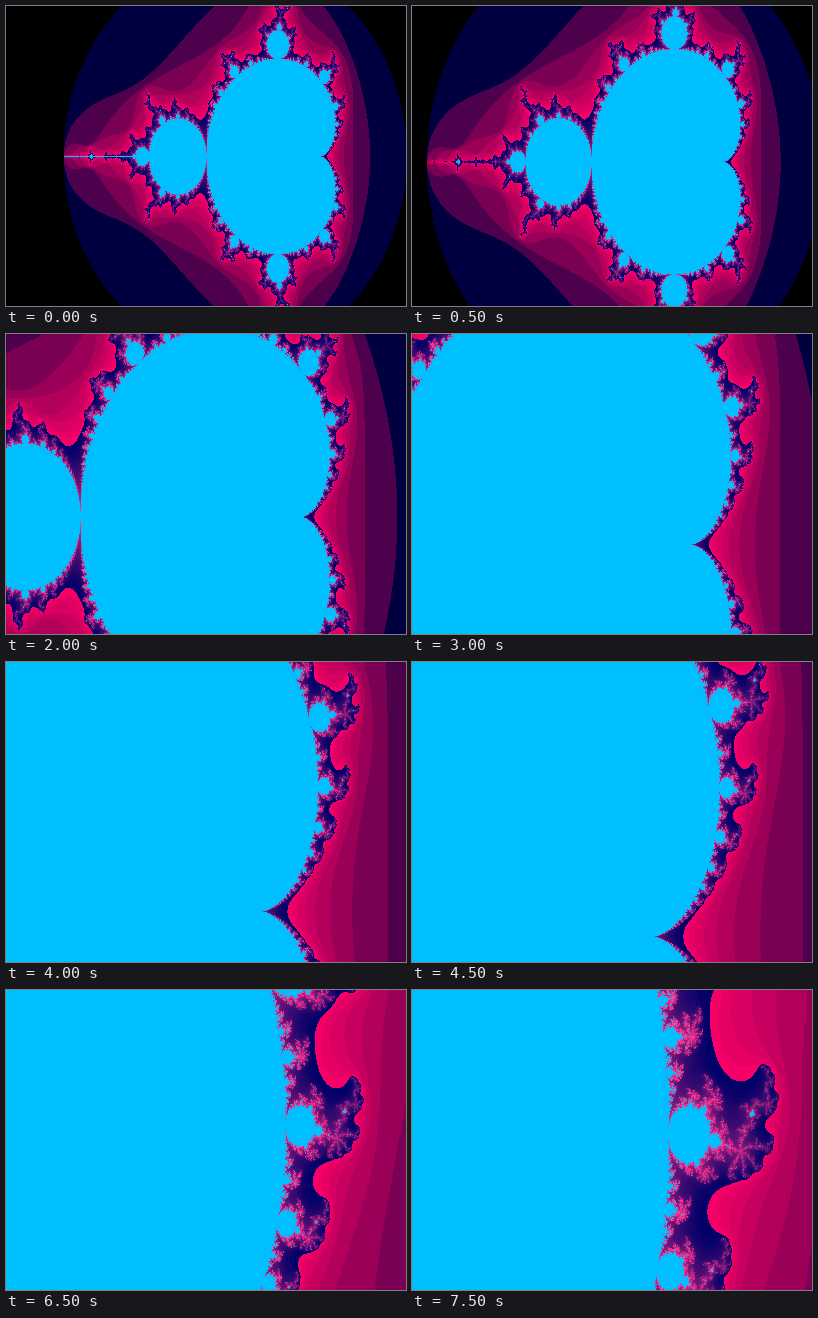
An HTML page with a canvas for the animation above (8000 ms loop, 400 px wide and 300 px high).

```html
<!DOCTYPE html>
<html lang="en">
<head>
<meta charset="utf-8">
<title>Mandelbrot zoom</title>
<style>
html, body { margin: 0; width: 100%; height: 100%; overflow: hidden; background: #000; }
canvas { display: block; }
</style>
</head>
<body>
<canvas id="stage" width="400" height="300"></canvas>
<script>
const W = 400, H = 300, STEP = 500, STEPS = 16, MAX = 200;
const LEFT = -2.5, TOP = 1, SPAN_X = 3.5, SPAN_Y = 2;
const FOCUS = { x: 0.42884, y: 0.231345 };
const INSIDE = [0, 191, 255];
const ctx = document.getElementById("stage").getContext("2d");

// Logarithmic colours: red restarts after the first decade, then green joins in.
const palette = Array.from({ length: MAX + 1 }, (_, n) => {
  if (n < 3) return [0, 0, 0];
  const decade = Math.log10(n - 2), late = Math.max(0, decade - 1);
  const red = decade < 1 ? decade : Math.min(late, 0.99);
  return [red * 256, late * 50, 64 + 40 * decade].map(Math.floor);
});

function colorAt(cx, cy) {
  // Skip the loop inside the cardioid and the period-2 disc.
  const u = cx - 0.25, q = u * u + cy * cy;
  if (q * (q + u) <= cy * cy / 4 || (cx + 1) ** 2 + cy * cy <= 1 / 16) return INSIDE;
  let x = 0, y = 0;
  for (let n = 1; n <= MAX; n++) {
    const nx = x * x - y * y + cx;
    y = 2 * x * y + cy;
    x = nx;
    if (x * x + y * y > 4) return palette[n];
  }
  return INSIDE;
}

function render(step) {
  const zoom = step ? Math.exp(0.1722 * step - 0.0287) : 1;
  const left = FOCUS.x + (LEFT - FOCUS.x) / zoom;
  const top = FOCUS.y + (TOP - FOCUS.y) / zoom;
  const dx = SPAN_X / zoom / W, dy = SPAN_Y / zoom / H;
  const image = ctx.createImageData(W, H);
  for (let py = 0, i = 0; py < H; py++) {
    for (let px = 0; px < W; px++, i += 4) {
      const [r, g, b] = colorAt(left + px * dx, top - py * dy);
      image.data[i] = r;
      image.data[i + 1] = g;
      image.data[i + 2] = b;
      image.data[i + 3] = 255;
    }
  }
  return image;
}

const views = Array.from({ length: STEPS }, (_, step) => render(step));
const start = performance.now();
let shown = -1;

function tick() {
  const step = Math.floor((performance.now() - start) / STEP) % STEPS;
  if (step !== shown) ctx.putImageData(views[shown = step], 0, 0);
  requestAnimationFrame(tick);
}
tick();
</script>
</body>
</html>
```
